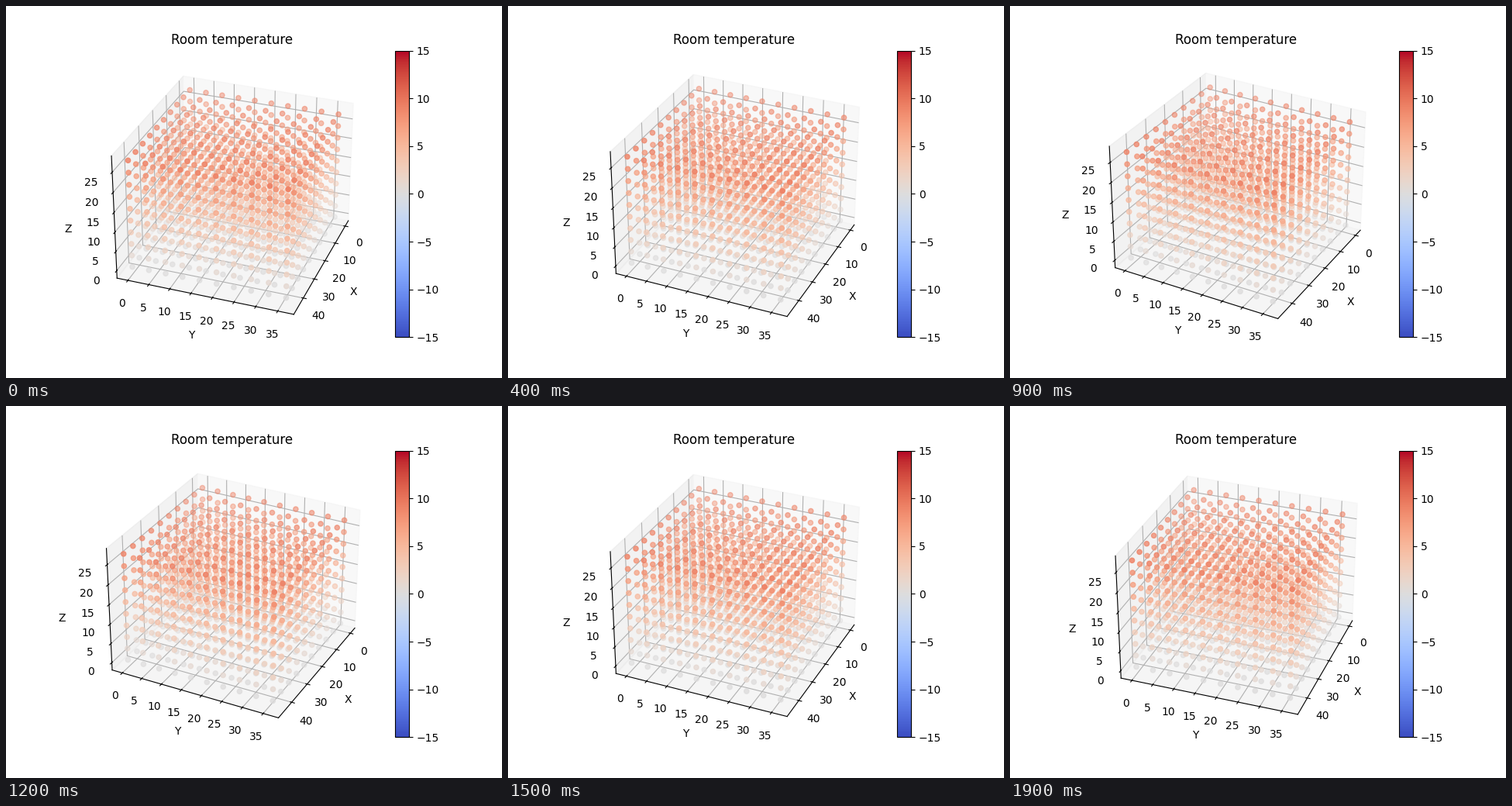
A matplotlib script that plays this animation: 640 by 480 pixels, repeating every 2000 ms.

```python
import numpy as np
import matplotlib.pyplot as plt
from matplotlib.animation import FuncAnimation

FRAMES = 20
INTERVAL = 100  # ms
START_AZIMUTH = 20

# Regular sensor grid; the air gets warmer with height.
x, y, z = (axis.ravel() for axis in np.meshgrid(
    np.arange(0, 50, 5), np.arange(0, 40, 4), np.arange(0, 30, 3)))
temperature = z / 3

fig = plt.figure(figsize=(6.4, 4.8), dpi=100)
ax = fig.add_subplot(projection="3d")
points = ax.scatter(x, y, z, c=temperature, cmap="coolwarm", vmin=-15, vmax=15)
fig.colorbar(points, ax=ax)
ax.set(title="Room temperature", xlabel="X", ylabel="Y", zlabel="Z")


def update(frame):
    """Swing the camera one degree per frame, out and back."""
    step = min(frame, FRAMES - 1 - frame)
    ax.view_init(elev=30, azim=START_AZIMUTH + step)
    return (points,)


anim = FuncAnimation(fig, update, frames=FRAMES, interval=INTERVAL,
                     repeat=True, repeat_delay=0, blit=False)
plt.show()
```
